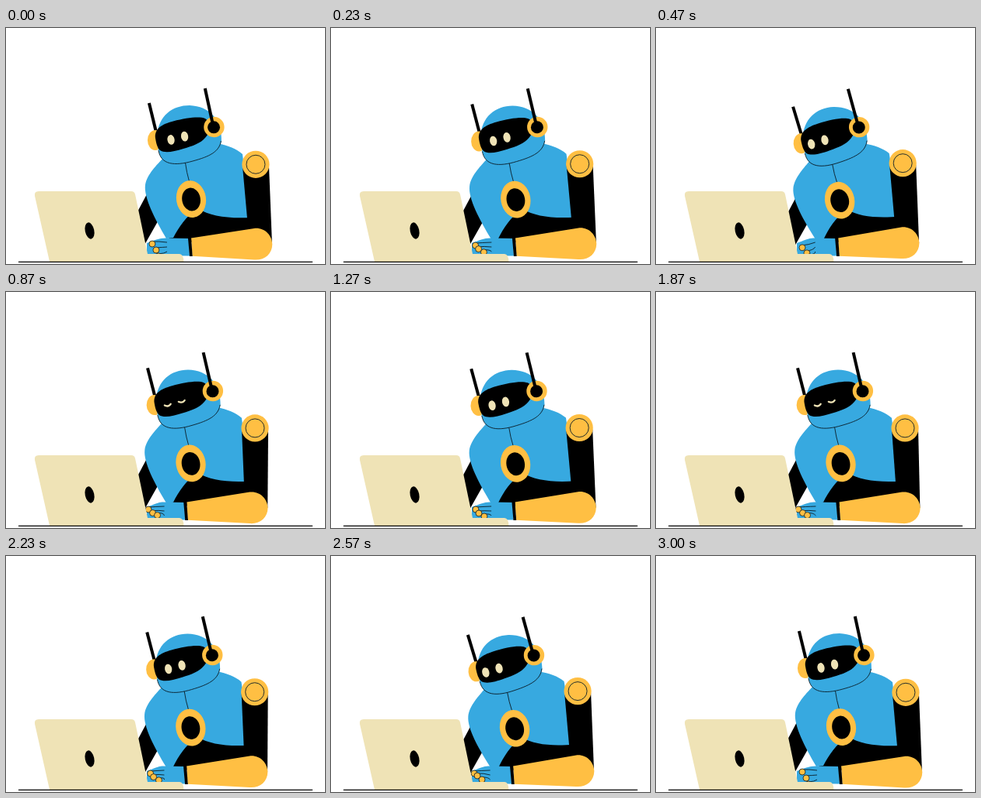
Recreate the animation shown at these times as an HTML page. Size 410x305 px, loop 3.03 s.

```html
<!DOCTYPE html>
<html lang="en">
<head>
<meta charset="utf-8">
<title>Robot at a laptop</title>
<style>
  html, body { margin: 0; width: 100%; height: 100%; overflow: hidden; background: #fff; }
  svg { display: block; width: 410px; height: 305px; }
  .blue { fill: #37a9e0; }
  .gold { fill: #ffbf43; }
  .cream { fill: #efe3b6; }
  .thin { fill: none; stroke: #0b1d28; stroke-width: .9; }
  .rod { stroke: #000; stroke-width: 4; }
  .lid { fill: none; stroke: #efe3b6; stroke-width: 2.2; stroke-linecap: round; }
</style>
</head>
<body>
<svg viewBox="0 0 410 305">
  <path id="farArm" d="M183 211 L165 245 L172 291 L199 243 Z"/>
  <path d="M209 272 L240 232 L308 238 L326 266 L236 277 Z"/>

  <g id="body">
    <path class="blue" d="M202 168 C195 176 181 189 179 203 C177 219 191 246 206 272 L215 271 C222 258 231 243 247 233.500 C262 243 285 246.500 314 245 L304 163 C296 156 286 152 272 149 Z"/>
    <path class="thin" d="M230.500 174 Q232 186 236 200"/>
    <g transform="rotate(-9 238 221)">
      <ellipse class="gold" cx="238" cy="221" rx="19" ry="24"/>
      <ellipse cx="238" cy="221.500" rx="11.800" ry="15"/>
    </g>
    <g id="head">
      <path class="rod" d="M184 97 L192.700 133"/>
      <ellipse class="gold" cx="192" cy="145" rx="10" ry="13"/>
      <path class="blue" d="M194 140 C196 113 214 100 236 100 C262 101 278 119 277 146 C274 160 262 166 240 172 C217 178.500 199 177 196 158 Z"/>
      <path class="thin" d="M196 158 C199 177 217 178.500 240 172 C262 166 274 160 276.500 146"/>
      <path d="M192 142 C191 130 200 124.500 215 120.500 C232 116 249 114 256 117 C264 121 264 134 256 142 C250 149 240 152.500 228 156 C215 160 204 162 198 158 C194 154 193 148 192 142 Z"/>
      <g id="eyes">
        <g id="open">
          <ellipse class="cream" cx="212.500" cy="144.300" rx="4.600" ry="6.400" transform="rotate(-10 212.500 144.300)"/>
          <ellipse class="cream" cx="230" cy="140" rx="4.600" ry="6.400" transform="rotate(-10 230 140)"/>
        </g>
        <g id="shut">
          <path class="lid" d="M208 144.800 Q213 147.500 216 143"/>
          <path class="lid" d="M226 140.300 Q231 142.800 234 138.500"/>
        </g>
      </g>
      <circle class="gold" cx="267.500" cy="128" r="13.200"/>
      <circle cx="267.100" cy="128.300" r="8"/>
      <path class="rod" d="M255.900 78 L265.600 123"/>
    </g>
  </g>

  <path id="upperArm"/>
  <g id="shoulder">
    <circle class="gold" cx="321" cy="176.300" r="17.600"/>
    <circle class="thin" cx="321" cy="176.300" r="12"/>
  </g>
  <path id="forearm" class="gold"/>
  <path id="hand" class="blue"/>
  <path id="cuff"/>
  <g id="fingers"></g>

  <path class="cream" d="M42 211 H161 Q165 211 166 215 L182 292 H223 Q228 292 228.500 302 H56 L37 217 Q36 211 42 211 Z"/>
  <ellipse cx="107.500" cy="262" rx="5.800" ry="10.800" transform="rotate(-12 107.500 262)"/>
  <path d="M16 302.300 H394" stroke="#000" stroke-width="1.300"/>
</svg>
<script>
const LOOP = 3030, END = 3000;
const $ = id => document.getElementById(id);
const set = (id, name, value) => $(id).setAttribute(name, value);
const mix = (a, b, k) => a + (b - a) * k;
const wave = (t, period, lag) => (1 - Math.cos(2 * Math.PI * (t - lag) / period)) / 2;

// Fingertips over one half-second tap: time, then x, y of each tip.
const taps = [
  [0, 188, 279, 193, 287, 196, 295],
  [70, 184, 281, 188, 284, 194, 289],
  [270, 186, 281, 190, 286, 197, 290],
  [370, 183, 281, 188.5, 285.5, 194.5, 288.5],
  [470, 188, 284, 194, 291, 197, 296],
  [500, 188, 279, 193, 287, 196, 295]
];

function tipsAt(t) {
  const p = t % 500;
  const i = taps.findIndex(row => row[0] > p);
  const a = taps[i - 1], b = taps[i];
  const k = (p - a[0]) / (b[0] - a[0]);
  return [1, 3, 5].map(c => [mix(a[c], b[c], k), mix(a[c + 1], b[c + 1], k)]);
}

function makePart(tag, attrs) {
  const el = document.createElementNS('http://www.w3.org/2000/svg', tag);
  for (const name in attrs) el.setAttribute(name, attrs[name]);
  $('fingers').append(el);
  return el;
}

const fingers = [0, 1, 2].map(() => [
  makePart('path', { class: 'thin' }),
  makePart('circle', { class: 'gold', r: 4, stroke: '#0b1d28', 'stroke-width': .8 })
]);

function drawEyes(t) {
  const p = t % 1000;
  const open = p < 730 ? 1 : p < 800 ? (800 - p) / 70 : p < 920 ? 0 : Math.min(1, (p - 920) / 70);
  const closed = open < .25;
  const look = wave(t, 1000, 70);
  const s = Math.max(open, .01);
  set('eyes', 'transform', `translate(${-8.3 * look} ${2.5 * look})`);
  set('open', 'visibility', closed ? 'hidden' : 'visible');
  set('shut', 'visibility', closed ? 'visible' : 'hidden');
  set('open', 'transform', `rotate(-13 221 142) translate(0 ${142 * (1 - s)}) scale(1 ${s}) rotate(13 221 142)`);
}

function drawArm(sway, slide) {
  const sx = 321 - 4 * sway, sy = 176.3 - 1.7 * sway;
  const ex = 322 - slide, ey = 279.5 - 1.6 * sway;
  const wx = 238 - slide;
  set('shoulder', 'transform', `translate(${sx - 321} ${sy - 176.3})`);
  set('upperArm', 'd', `M${sx - 17} ${sy + 2} L${sx + 17} ${sy + 2} L${ex + 20} ${ey} L${ex - 9} ${ey} Z`);
  set('forearm', 'd', `M${wx} 271.500 L${ex - 3} ${ey - 20.5} C${ex + 10} ${ey - 22} ${ex + 20} ${ey - 12} ${ex + 20.3} ${ey}
    C${ex + 20} ${ey + 13} ${ex + 10} ${ey + 21} ${ex - 3} ${ey + 20} L${wx + 1.5} 294.800 Z`);
  set('cuff', 'd', `M${wx - 4} 271.800 L${wx} 271.300 L${wx + 1.7} 295 L${wx - 2} 295 Z`);
  set('hand', 'd', `M${wx - 3} 272 L${wx - 31} 271.500 C198 271 190 274.500 181 278 L181 294 L${wx - 2} 294.500 Z`);
}

function drawFingers(t, slide) {
  tipsAt(t).forEach(([x, y], i) => {
    const [line, tip] = fingers[i];
    line.setAttribute('d', `M${x} ${y - 3} Q${x + 8} ${y - 3.5} ${207 - slide * .6} ${277 + i * 6}`);
    tip.setAttribute('cx', x);
    tip.setAttribute('cy', y);
  });
}

function draw(now) {
  const t = Math.min(now % LOOP, END);
  const sway = wave(t, 1000, 35);
  const slide = 6 * wave(t, 1500, 25);
  set('body', 'transform', `rotate(${-2.45 * sway} 278 268)`);
  set('head', 'transform', `rotate(${-.8 * sway} 235 172)`);
  set('farArm', 'transform', `translate(${-sway} ${4 * sway})`);
  drawEyes(t);
  drawArm(sway, slide);
  drawFingers(t, slide);
}

const start = performance.now();
function tick() {
  draw(performance.now() - start);
  requestAnimationFrame(tick);
}
tick();
</script>
</body>
</html>
```
